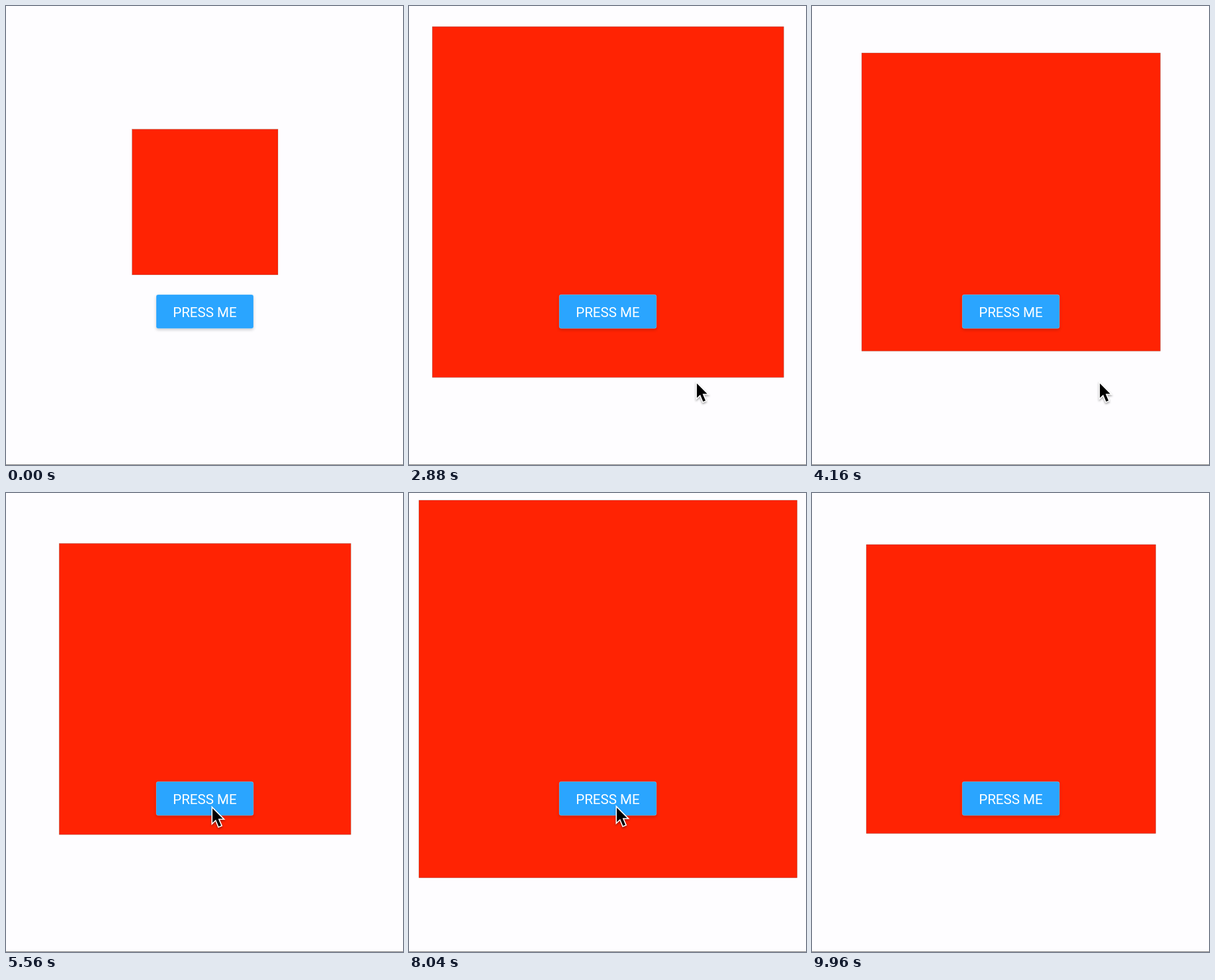
Recreate the animation shown at these times as an HTML page. Size 600 by 695 pixels, loop 10000 ms.

```html
<!DOCTYPE html>
<html lang="en">
<head>
<meta charset="utf-8">
<title>Spring after a delay</title>
<style>
  html, body { margin: 0; width: 100%; height: 100%; overflow: hidden; background: #fefdff; }
  svg { display: block; width: 600px; height: 695px; }
  #box { fill: #ff2303; stroke: #54281e; stroke-opacity: .4; stroke-width: .6; }
  #button { fill: #2aa5ff; stroke: #fff; stroke-opacity: .22; filter: drop-shadow(0 2px 2px rgba(0, 0, 0, .2)); }
  text { font: 400 20.6px Roboto, Arial, sans-serif; fill: #fff; text-anchor: middle; }
  #cursor { filter: drop-shadow(0 2px 1.5px rgba(0, 0, 0, .35)); }
  #cursor path { fill: #000; stroke: #fff; stroke-width: 3.2; paint-order: stroke; stroke-linejoin: miter; }
</style>
</head>
<body>
<svg viewBox="0 0 600 695">
  <rect width="600" height="695" fill="#fefdff"/>
  <rect y="694" width="600" height="1" fill="#858585"/>
  <rect id="box"/>
  <rect id="button" x="227" y="437" width="147" height="51.3" rx="3"/>
  <text x="300.5" y="470.6">PRESS ME</text>
  <g id="cursor"><path d="M1.6 3.4V25.2L6.6 20.4L11 31L14.6 29.5L10.2 19.2H17.2Z"/></g>
</svg>
<script>
  const LOOP = 10000, STEP = 40;
  const SIZE = 220.4, CX = 300.8, CY = 296.8;
  const DELAY = 2000;
  const PRESSES = [728, 5860];

  // Damped spring: stiffness and damping for tension 40, friction 1
  const STIFFNESS = 230.2, DAMPING = 4;
  const DECAY = DAMPING / 2, OMEGA = Math.sqrt(STIFFNESS - DECAY * DECAY);

  // Pointer tip: [time, x, y]
  const ENTER = 240, LEAVE = 8600;
  const PATH = [
    [240, 420, 535], [360, 255, 455], [560, 255, 455],
    [720, 310, 474], [1240, 310, 474], [1600, 388, 501],
    [2120, 433.5, 568], [4680, 433.5, 568], [5300, 310.5, 474],
    [7400, 310.5, 474], [7700, 312.5, 473]
  ];

  const box = document.getElementById('box');
  const cursor = document.getElementById('cursor');

  function spring(ms) {
    if (ms <= 0) return 0;
    const s = ms / 1000, a = OMEGA * s;
    return 1 - Math.exp(-DECAY * s) * (Math.cos(a) + DECAY / OMEGA * Math.sin(a));
  }

  function scaleAt(t) {
    const press = PRESSES.filter(p => p <= t).pop();
    return press === undefined ? 1 : 1 + spring(t - press - DELAY);
  }

  function tipAt(t) {
    const next = PATH.findIndex(p => p[0] > t);
    if (next < 1) return PATH[next < 0 ? PATH.length - 1 : 0].slice(1);
    const [t0, x0, y0] = PATH[next - 1], [t1, x1, y1] = PATH[next];
    const u = (t - t0) / (t1 - t0), k = u * u * (3 - 2 * u);
    return [x0 + (x1 - x0) * k, y0 + (y1 - y0) * k];
  }

  function setAttrs(el, attrs) {
    for (const name in attrs) el.setAttribute(name, attrs[name]);
  }

  function draw(t) {
    const size = SIZE * scaleAt(t);
    setAttrs(box, { x: CX - size / 2, y: CY - size / 2, width: size, height: size });
    const shown = t >= ENTER && t < LEAVE;
    setAttrs(cursor, {
      visibility: shown ? 'visible' : 'hidden',
      transform: `translate(${tipAt(t)})`
    });
  }

  const start = performance.now();
  function tick() {
    const t = (performance.now() - start) % LOOP;
    draw(Math.floor(t / STEP) * STEP);
    requestAnimationFrame(tick);
  }
  tick();
</script>
</body>
</html>
```
